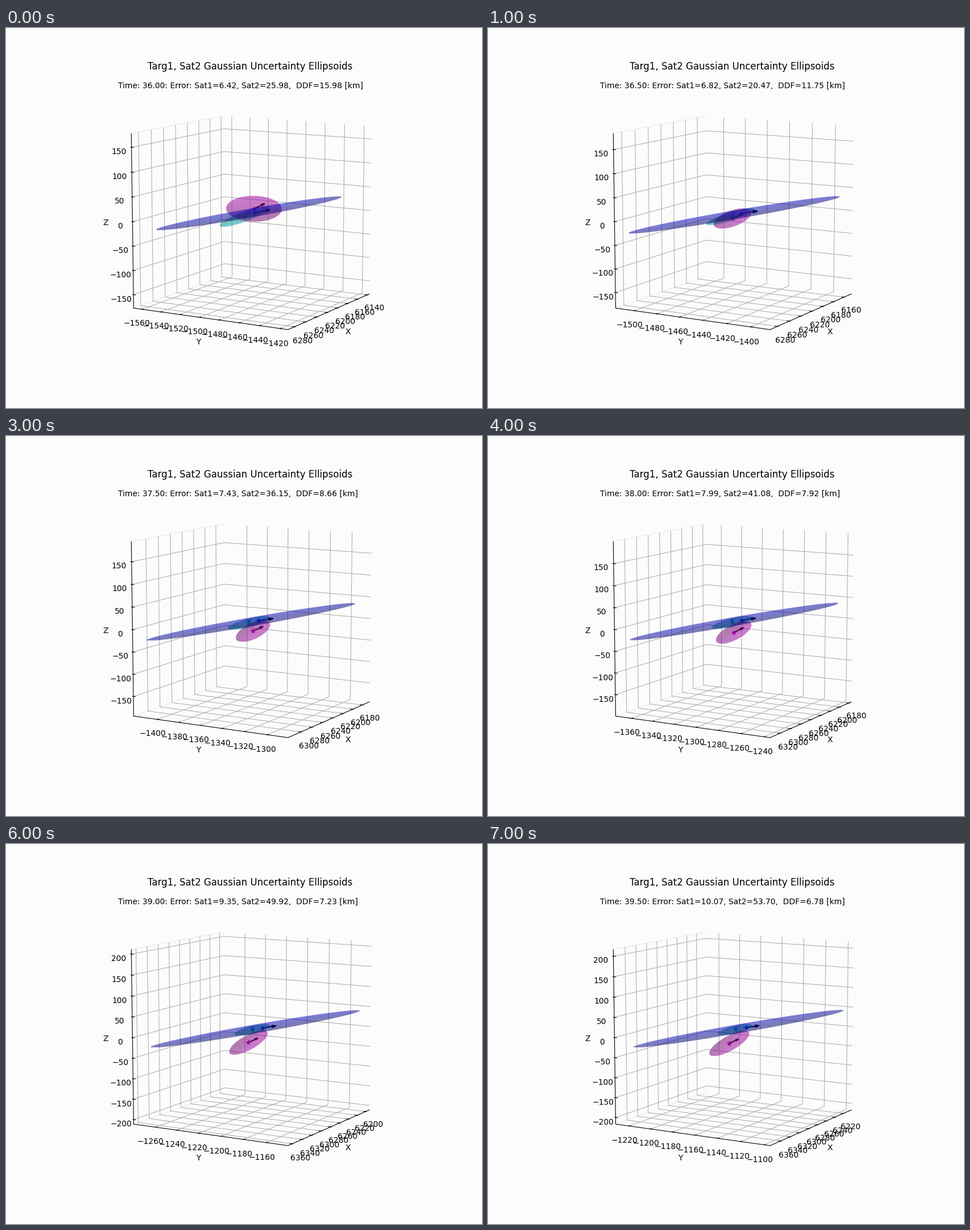
These frames come from a looping animation (837 by 669 pixels, 8 s). A matplotlib script:

```python
import matplotlib.pyplot as plt
import numpy as np
from matplotlib.animation import FuncAnimation
from matplotlib.collections import LineCollection
from matplotlib.patches import Polygon

W, H, DPI = 837, 669, 100
STEPS = 8
BACK = "#fcfcfc"

# Camera: a cube of half side 1 seen from azimuth 30, elevation 10
COS_A, SIN_A = np.cos(np.pi / 6), 0.5
COS_E, SIN_E = np.cos(np.pi / 18), np.sin(np.pi / 18)
CX, CY, SCALE, DIST = 435.92, 330.9, 153.19, 18.18
TICK_GAP, LABEL_GAP = 0.1, 0.2176

# Values at the key steps; those between are interpolated
KEYS = [0, 1, 3, 5, 6, 7]
X_MID = [6212.9, 6218.6, 6244.0, 6268.2, 6279.5, 6290.5]
X_HALF = [78.3, 73.6, 79.0, 85.5, 88.7, 90.7]
Y_MID = [-1490.6, -1450.5, -1352.5, -1257.7, -1211.1, -1163.9]
Y_HALF = [78.06, 66.1, 70.3, 70.08, 69.5, 68.7]

SAT1 = [6.42, 6.82, 7.43, 8.55, 9.35, 10.07]
SAT2 = [25.98, 20.47, 36.15, 46.01, 49.92, 53.70]
DDF = [15.98, 11.75, 8.66, 7.17, 7.23, 6.78]

# Long blue ellipse: left tip and right tip
BLUE = [[264, 247, 247, 252, 254.5, 256],
        [355, 361, 359.5, 358, 357.5, 357.5],
        [590, 618.5, 614, 618, 622, 625],
        [297.5, 297, 295, 294, 293.5, 293]]
# Centre x, centre y, half width, half height, tilt (correlation)
MAGENTA = [[436, 430, 434.3, 429.8, 426.3, 424.3],
           [318.2, 335.3, 343.5, 348, 349.5, 351],
           [49, 33.2, 30.2, 32.2, 33.8, 35.2],
           [22.7, 17.8, 19, 21, 21.5, 22.5],
           [-0.03, 0.56, 0.6, 0.72, 0.74, 0.76]]
TEAL = [[419.5, 426, 426.8, 430.3, 432.7, 434.7],
        [332, 332.3, 329.2, 327.6, 327.2, 326.5],
        [44, 42, 36.5, 32, 30.8, 29.5],
        [18.3, 15, 12.3, 10.6, 10.3, 10],
        [0.86, 0.85, 0.76, 0.7, 0.7, 0.7]]
CROSS = [[425.5, 431, 427, 431, 433, 435],
         [324, 327, 325, 324, 324, 324]]
BLUE_STAR = [[437, 446, 443.5, 447.5, 451, 453.5],
             [325, 326, 325.3, 323.8, 323.8, 323.3]]
BLUE_ARROW = [[27, 28, 26, 24, 23.5, 23],
              [-5, -3.7, -4, -3.5, -3.5, -3.5]]


def at(step, row):
    return float(np.interp(step, KEYS, row))


def project(x, y, z):
    right = y * COS_A - x * SIN_A
    ahead = x * COS_A + y * SIN_A
    up = z * COS_E - ahead * SIN_E
    depth = ahead * COS_E + z * SIN_E
    zoom = SCALE * DIST / (DIST - depth)
    return CX + right * zoom, CY - up * zoom


def path(*points):
    return [project(*p) for p in points]


def ticks(mid, half, gap):
    """Pairs of tick value and its place from -1 to 1."""
    first = int(np.ceil((mid - half) / gap)) * gap
    values = np.arange(first, mid + half, gap)
    places = [(int(v), (v - mid) / half) for v in values]
    return [(v, p) for v, p in places if abs(p) < 0.956]


def number(v):
    return str(v).replace("-", "\u2212")


def tick_text(point, value):
    ax.text(*project(*point), number(value), ha="center", va="top", fontsize=10)


def draw_box(step):
    grid, marks = [], []
    near, far = 1.016, 0.968
    out = 1 + TICK_GAP

    for v, p in ticks(at(step, X_MID), at(step, X_HALF), 20):
        grid.append(path((p, 1, -1), (p, -1, -1), (p, -1, 1)))
        marks.append(path((p, near, -1), (p, far, -1)))
        tick_text((p, out, -out), v)
    for v, p in ticks(at(step, Y_MID), at(step, Y_HALF), 20):
        grid.append(path((1, p, -1), (-1, p, -1), (-1, p, 1)))
        marks.append(path((near, p, -1), (far, p, -1)))
        tick_text((out, p, -out), v)
    for v, p in ticks(0, 177.8 + 5.57 * step, 50):
        grid.append(path((1, -1, p), (-1, -1, p), (-1, 1, p)))
        marks.append(path((1, -near, p), (1, -far, p)))
        tick_text((out, -out, p), v)

    pane = [path((1, -1, 1), (-1, -1, 1)), path((1, -1, -1), (-1, -1, -1))]
    edges = [path((1, -1, 1), (1, -1, -1), (1, 1, -1), (-1, 1, -1))]
    for lines, color, order in ((pane, "#e9e9e9", 1), (grid, "#b0b0b0", 2),
                                (edges + marks, "black", 3)):
        ax.add_collection(LineCollection(lines, colors=color, linewidths=0.8,
                                         zorder=order), autolim=False)

    off = 1 + LABEL_GAP
    for name, point in (("X", (0, off, -off)), ("Y", (off, 0, -off)),
                        ("Z", (off, -off, 0))):
        ax.text(*project(*point), name, ha="center", va="center", fontsize=10)


def draw_ellipse(cx, cy, hw, hh, tilt, hue, light, dark, toward, order):
    """Translucent ellipse, shaded from dark to light along a direction."""
    t = np.linspace(0, 2 * np.pi, 181)
    side = np.sqrt(1 - tilt ** 2)
    outline = np.column_stack([cx + hw * np.cos(t),
                               cy - hh * (tilt * np.cos(t) + side * np.sin(t))])
    gx, gy = np.meshgrid(np.linspace(-1, 1, 160), np.linspace(-1, 1, 160))
    # Ellipse coordinates, in which the outline is a unit circle
    a, b = gx, (-gy - tilt * gx) / side
    mix = np.clip(0.5 + 0.9 * (a * toward[0] + b * toward[1]), 0, 1)
    image = np.empty(gx.shape + (4,))
    image[..., :3] = (dark + (light - dark) * mix)[..., None] * np.array(hue)
    image[..., 3] = 0.51
    picture = ax.imshow(image, extent=(cx - hw, cx + hw, cy - hh, cy + hh),
                        origin="lower", aspect="auto", zorder=order,
                        interpolation="bilinear")
    picture.set_clip_path(Polygon(outline, transform=ax.transData))


def draw_blue(step):
    x0, y0, x1, y1 = (at(step, row) for row in BLUE)
    angle = np.arctan2(y0 - y1, x1 - x0)
    major, minor = np.hypot(x1 - x0, y1 - y0) / 2, 7.7
    c, s = np.cos(angle), np.sin(angle)
    hw = np.hypot(major * c, minor * s)
    hh = np.hypot(major * s, minor * c)
    tilt = (major ** 2 - minor ** 2) * c * s / (hw * hh)
    draw_ellipse((x0 + x1) / 2, (y0 + y1) / 2, hw, hh, tilt,
                 (0, 0, 1), 0.72, 0.45, (0, 1), 7)


def draw_arrow(x, y, dx, dy):
    tip = np.array([x + dx, y + dy])
    lines = [[(x, y), tip]]
    for turn in (-0.26, 0.26):
        c, s = np.cos(turn), np.sin(turn)
        barb = 0.32 * np.array([dx * c - dy * s, dx * s + dy * c])
        lines.append([tip, tip - barb])
    ax.add_collection(LineCollection(lines, colors="black", linewidths=1.5,
                                     zorder=4), autolim=False)


def draw_mark(x, y, marker, color, size):
    ax.plot([x], [y], marker=marker, color=color, ms=size, mew=1, zorder=4.5)


def draw(step):
    ax.clear()
    ax.set_xlim(0, W)
    ax.set_ylim(H, 0)
    ax.axis("off")

    ax.text(428.96, 73, "Targ1, Sat2 Gaussian Uncertainty Ellipsoids",
            ha="center", va="baseline", fontsize=12)
    ax.text(197.1, 106, f"Time: {36 + step / 2:.2f}: Error: "
            f"Sat1={at(step, SAT1):.2f}, Sat2={at(step, SAT2):.2f},  "
            f"DDF={at(step, DDF):.2f} [km]", va="baseline", fontsize=10)
    draw_box(step)

    teal = [at(step, row) for row in TEAL]
    magenta = [at(step, row) for row in MAGENTA]
    star = [at(step, row) for row in BLUE_STAR]

    draw_mark(*teal[:2], "*", "#00bfbf", 5)
    draw_mark(*(at(step, row) for row in CROSS), "x", "#007f9f", 4.5)
    draw_mark(*star, "*", "#0000ff", 5.5)
    draw_mark(*magenta[:2], "*", "#bf00bf", 5.5)
    draw_arrow(*star, *(at(step, row) for row in BLUE_ARROW))
    draw_arrow(*magenta[:2], 19 - 0.4 * step, -9 + 0.2 * step)

    toward = (0, 1) if step == 0 else (0.75, -0.65)
    draw_ellipse(*teal, (0, 1, 1), 0.62, 0.5, (0, -1), 5)
    draw_ellipse(*magenta, (1, 0, 1), 0.61, 0.42, toward, 6)
    draw_blue(step)
    return []


plt.rcParams["font.family"] = "DejaVu Sans"
# The small excess keeps the pixel size from being rounded down
fig = plt.figure(figsize=((W + 0.01) / DPI, (H + 0.01) / DPI), dpi=DPI,
                 facecolor=BACK)
ax = fig.add_axes([0, 0, 1, 1])
anim = FuncAnimation(fig, draw, frames=STEPS, init_func=lambda: [],
                     interval=1000, repeat=True, repeat_delay=0)
plt.show()
```
